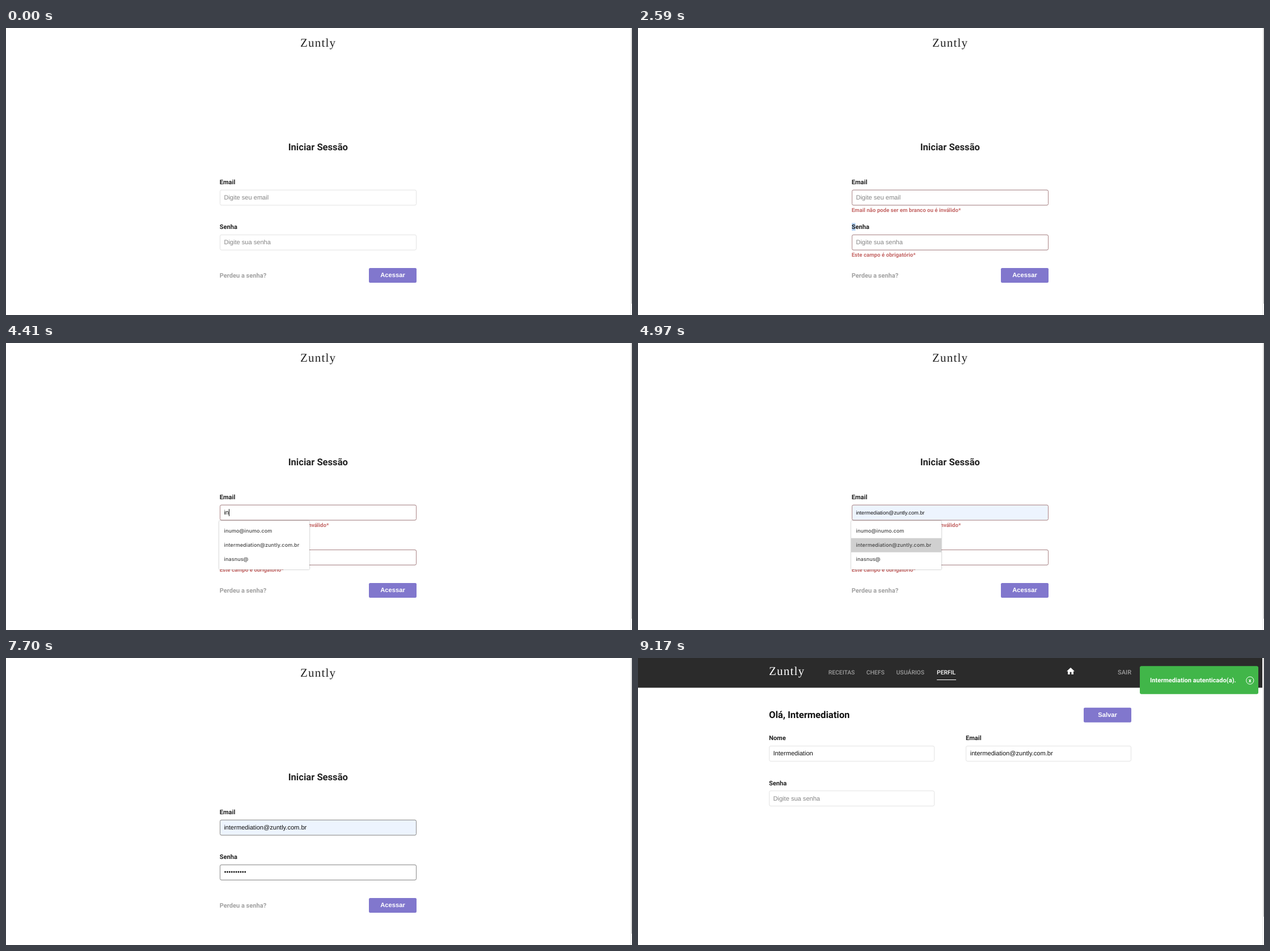
Recreate the animation shown at these times as an HTML page. Size 1104 by 507 pixels, loop 9240 ms.

```html
<!DOCTYPE html>
<html lang="pt-BR">
<head>
<meta charset="utf-8">
<title>Iniciar Sessão</title>
<style>
  html, body { margin: 0; width: 100%; height: 100%; overflow: hidden; background: #fff; }
  svg { display: block; width: 1104px; height: 507px; text-rendering: geometricPrecision; }
  text { fill: #222; font: 700 11.08px Roboto, sans-serif; }
  .logo { font: 400 21px "Liberation Serif", serif; letter-spacing: 1.2px; }
  .title { font-size: 16.6px; }
  .error { font-size: 9.66px; fill: #c46766; }
  .link { fill: #a0a0a0; }
  .value, .hint { font: 400 11.08px "Liberation Sans", Arial, sans-serif; fill: #111; }
  .hint { fill: #858585; }
  .preview { font-size: 9.2px; }
  .action { font: 700 11.2px "Liberation Sans", Arial, sans-serif; fill: #fff; text-anchor: middle; }
  .nav { font-size: 10.38px; font-weight: 500; fill: #9c9c9c; }
  .light { fill: #fff; }
  .button { fill: #8177cd; }
  .field { fill: #fff; stroke: #e3e3e3; }
  .bad .field { fill: none; stroke: #ac8587; }
  .sent .field { fill: none; stroke: #8a8a8a; }
  .caret { stroke: #111; }
  .panel { fill: #fff; filter: drop-shadow(0 .5px 1px #0006); }
  .list text { font: 500 9px Inter, sans-serif; letter-spacing: .1px; fill: #444; }
  .hover { fill: #d0d0d0; }
</style>
</head>
<body>
<svg viewBox="0 0 1104 507">
  <defs>
    <rect id="wide" width="346" height="26.8" rx="2.5"/>
    <rect id="half" width="291" height="26.8" rx="2.5"/>
    <rect id="press" width="84" height="26" rx="2.2"/>
    <path id="bar" d="M.5 0v12.5"/>
  </defs>

  <g data-at="0-8120">
    <text class="logo" x="519" y="33">Zuntly</text>
    <text class="title" x="550.3" y="216.2" text-anchor="middle">Iniciar Sessão</text>

    <text x="376.7" y="276">Email</text>
    <rect data-at="980-3080" x="377" y="344.5" width="6.5" height="13.5" fill="#b5d3f6"/>
    <text x="376.7" y="355.2">Senha</text>

    <use class="field" href="#wide" x="377.5" y="286.2"/>
    <use class="field" href="#wide" x="377.5" y="365.4"/>
    <rect data-at="4690-8120" x="378" y="286.7" width="345" height="25.8" rx="2" fill="#edf4fe"/>

    <g class="bad" data-at="1680-7280">
      <use class="field" href="#wide" x="377.5" y="286.2"/>
      <use class="field" href="#wide" x="377.5" y="365.4"/>
      <text class="error" x="376.7" y="325.2">Email não pode ser em branco ou é inválido*</text>
      <text class="error" x="376.7" y="404.4">Este campo é obrigatório*</text>
    </g>
    <g class="sent" data-at="7280-8120">
      <use class="field" href="#wide" x="377.5" y="286.2"/>
      <use class="field" href="#wide" x="377.5" y="365.4"/>
    </g>

    <text class="hint" data-at="0-4270" x="384.4" y="303">Digite seu email</text>
    <text class="value" data-at="4270-4410" x="384.4" y="303">i</text>
    <text class="value" data-at="4410-4690" x="384.4" y="303">in</text>
    <text class="value preview" data-at="4690-4970" x="384.4" y="303">inumo@inumo.com</text>
    <text class="value preview" data-at="4970-5180" x="384.4" y="303">intermediation@zuntly.com.br</text>
    <text class="value" data-at="5180-8120" x="384.4" y="303">intermediation@zuntly.com.br</text>

    <text class="hint" data-at="0-6090" x="384.4" y="382.2">Digite sua senha</text>
    <path data-at="6090-8120" d="M386.6 378h35.2" fill="none" stroke="#111" stroke-width="2.9"
      stroke-linecap="round" stroke-dasharray="0 3.9"/>

    <use class="caret" href="#bar" data-at="3080-3710 4200-4270" x="384.5" y="293.3"/>
    <use class="caret" href="#bar" data-at="4270-4410" x="387" y="293.3"/>
    <use class="caret" href="#bar" data-at="4410-4690" x="393" y="293.3"/>
    <use class="caret" href="#bar" data-at="5180-5460" x="532" y="293.3"/>
    <use class="caret" href="#bar" data-at="5460-6020" x="384.5" y="372.5"/>
    <use class="caret" href="#bar" data-at="6090-6650" x="423" y="372.5"/>

    <text class="link" x="376.7" y="441">Perdeu a senha?</text>
    <use class="button" href="#press" x="640" y="424"/>
    <text class="action" x="682" y="440.4">Acessar</text>

    <g id="lists"></g>
  </g>

  <g data-at="8120-9240">
    <path d="M0 0h1101v52.6H0z" fill="#2b2b2b"/>
    <text class="logo light" x="231" y="30.3">Zuntly</text>
    <text class="nav" x="335.7" y="28.7">RECEITAS</text>
    <text class="nav" x="402.7" y="28.7">CHEFS</text>
    <text class="nav" x="455.6" y="28.7">USUÁRIOS</text>
    <text class="nav light" x="527" y="28.7">PERFIL</text>
    <path d="M527 38.5h34" stroke="#fff"/>
    <path d="M10 20v-6h4v6h5v-8h3L12 3 2 12h3v8z" fill="#fff" transform="translate(754.6 15) scale(.7)"/>
    <text class="nav" x="846" y="29.4" style="font-size:11.08px">SAIR</text>

    <text class="title" x="231" y="106.4" style="fill:#111">Olá, Intermediation</text>
    <use class="button" href="#press" x="786" y="87.8"/>
    <text class="action" x="828" y="104.2">Salvar</text>

    <text x="231" y="145.3">Nome</text>
    <use class="field" href="#half" x="231.5" y="155.5"/>
    <text class="value" x="238.5" y="172.4">Intermediation</text>
    <text x="578" y="145.3">Email</text>
    <use class="field" href="#half" x="578.5" y="155.5"/>
    <text class="value" x="585.7" y="172.4">intermediation@zuntly.com.br</text>
    <text x="231" y="224.5">Senha</text>
    <use class="field" href="#half" x="231.5" y="234.7"/>
    <text class="hint" x="238.5" y="251.6">Digite sua senha</text>
  </g>

  <path d="M1101 0h3v507h-3z" fill="#fbfbfb"/>
  <path d="M1101.5 0v507" stroke="#ebebeb"/>
  <path data-at="0-8120" d="M1103.5 0v487" stroke="#bbb"/>
  <path data-at="8120-9240" d="M1103.5 0v457" stroke="#bbb"/>

  <g id="toast" data-at="8120-9240">
    <rect x="885" y="14.3" width="209" height="49.5" rx="3" fill="#41b649"/>
    <text class="light" x="903" y="43.2">Intermediation autenticado(a).</text>
    <circle cx="1079.3" cy="39.7" r="6.6" fill="none" stroke="#fff"/>
    <text class="light" x="1079.3" y="43" text-anchor="middle" style="font-size:9.7px">x</text>
  </g>
</svg>
<script>
  const LOOP = 9240;
  const matches = ["inumo@inumo.com", "intermediation@zuntly.com.br", "inasnus@"];

  // Suggestion box: time window, width, rows, highlighted row
  function list(at, width, rows, hover = -1) {
    const height = rows.length * 25 + 11;
    const mark = hover < 0 ? "" :
      `<rect class="hover" x="376" y="${319.7 + hover * 25}" width="${width}" height="25"/>`;
    const lines = rows.map((row, i) => `<text x="384.6" y="${335.3 + i * 25}">${row}</text>`);
    return `<g class="list" data-at="${at}">
      <rect class="panel" x="376" y="314" width="${width}" height="${height}" rx="1.5"/>
      ${mark}${lines.join("")}</g>`;
  }

  document.getElementById("lists").innerHTML = [
    list("3080-4270", 150, ["valdirene.luso@tovmail.com", "inumo@inumo.com",
      "valtinobrotas@numil.com", "tizu@tizu.com", "patumo@numil.com", "valtinolunders@numil.com"]),
    list("4270-4410", 159, [...matches, "iratumo@numil.com", "itizu@tizu.com", "ilunders@numil.com"]),
    list("4410-4690", 159, matches),
    list("4690-4970", 159, matches, 0),
    list("4970-5180", 159, matches, 1),
  ].join("");

  const timed = [...document.querySelectorAll("[data-at]")].map(el => ({
    el, spans: el.dataset.at.split(" ").map(span => span.split("-").map(Number)),
  }));
  const toast = document.getElementById("toast");

  function draw() {
    const t = performance.now() % LOOP;
    for (const { el, spans } of timed) {
      el.style.display = spans.some(([from, to]) => t >= from && t < to) ? "" : "none";
    }
    const p = Math.min(1, Math.max(0, (t - 8120) / 560));
    toast.setAttribute("transform", `translate(${220 * (1 - p) ** 3} 0)`);
    requestAnimationFrame(draw);
  }
  draw();
</script>
</body>
</html>
```
